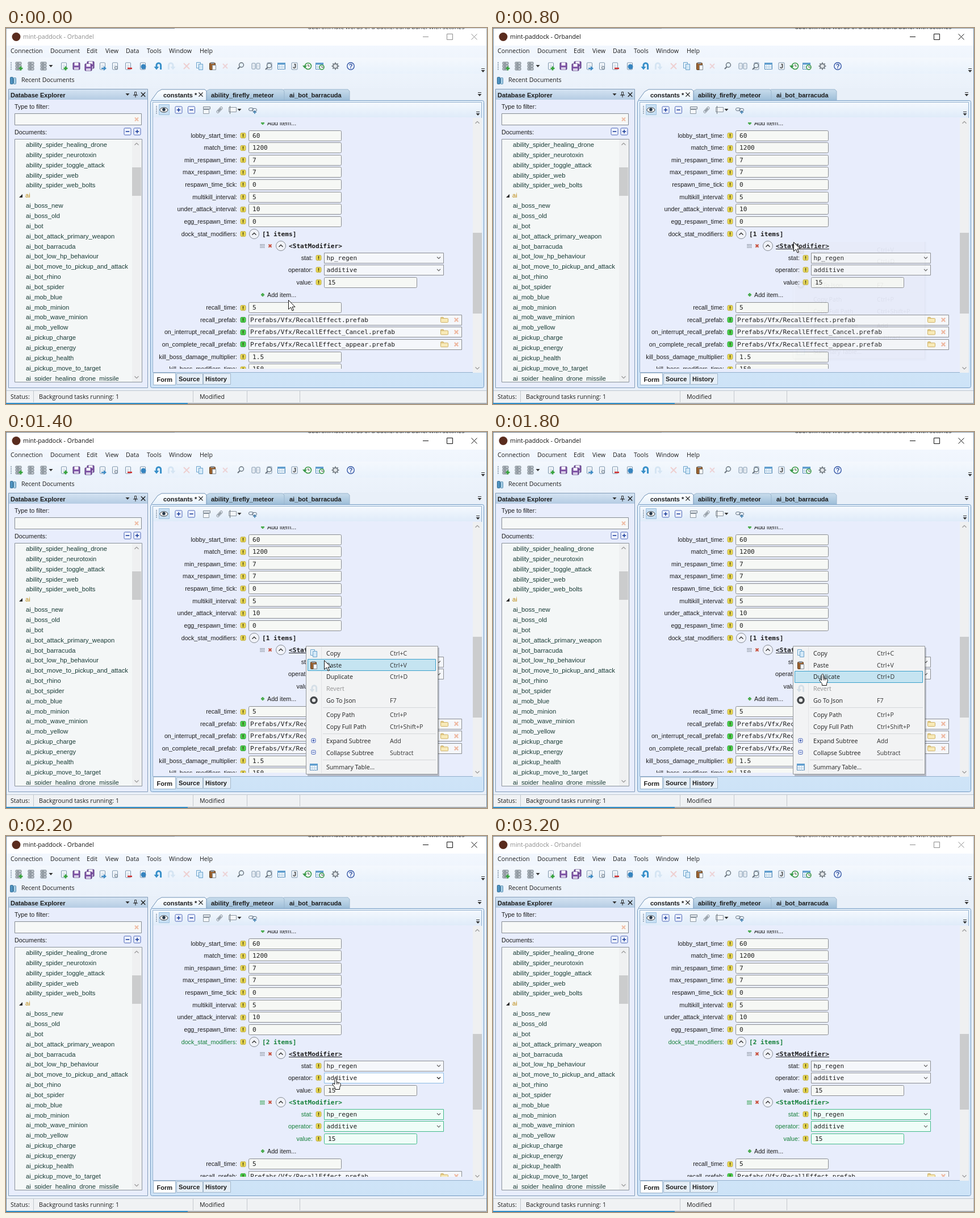
These frames come from a looping animation (847x661 px, 3400 ms). An HTML page with a canvas:

```html
<!DOCTYPE html>
<html lang="en">
<head>
<meta charset="utf-8">
<title>Document editor</title>
<style>
html, body { margin: 0; width: 100%; height: 100%; overflow: hidden; background: #eef4fc; }
canvas { display: block; }
</style>
</head>
<body>
<canvas id="stage" width="847" height="661"></canvas>
<script>
const g = document.getElementById('stage').getContext('2d');
const UI = '10.65px "Open Sans", sans-serif';
const LABEL = '10.72px "Liberation Sans", Arial, sans-serif';
const TREE = '11.24px "Liberation Sans", Arial, sans-serif';
const BOLD = 'bold 11px "Liberation Sans", Arial, sans-serif';
const MONO = '11.15px "DejaVu Sans Mono", monospace';
const INK = '#1c1c1c', GREEN = '#15803a', RED = '#c8503c';

// Drawing helpers; boxes are given by their outer pixel bounds.
function box(x, y, w, h, fill, stroke, r = 0) {
  g.beginPath();
  const d = stroke ? .5 : 0;
  g.roundRect(x + d, y + d, w - 2 * d, h - 2 * d, r);
  if (fill) { g.fillStyle = fill; g.fill(); }
  if (stroke) { g.strokeStyle = stroke; g.lineWidth = 1; g.stroke(); }
}
function text(s, x, y, font = UI, color = INK, align = 'left') {
  g.font = font; g.fillStyle = color; g.textAlign = align;
  g.fillText(s, x, y);
}
// Baseline that centres a line of text on y
const base = y => Math.round(y + 3.5);
function line(pts, color = INK, w = 1) {
  g.beginPath();
  for (let i = 0; i < pts.length; i += 2) g.lineTo(pts[i], pts[i + 1]);
  g.strokeStyle = color; g.lineWidth = w; g.stroke();
}
function shape(pts, color) {
  g.beginPath();
  for (let i = 0; i < pts.length; i += 2) g.lineTo(pts[i], pts[i + 1]);
  g.fillStyle = color; g.fill();
}
function disc(x, y, r, fill, stroke, w = 1) {
  g.beginPath(); g.arc(x, y, r, 0, 7);
  if (fill) { g.fillStyle = fill; g.fill(); }
  if (stroke) { g.strokeStyle = stroke; g.lineWidth = w; g.stroke(); }
}
function fade(y0, y1, ...colors) {
  const f = g.createLinearGradient(0, y0, 0, y1);
  colors.forEach((c, i) => f.addColorStop(i / (colors.length - 1), c));
  return f;
}
function clipped(x, y, w, h, draw) {
  g.save(); g.beginPath(); g.rect(x, y, w, h); g.clip(); draw(); g.restore();
}
function cross(x, y, r, color, w) {
  line([x - r, y - r, x + r, y + r], color, w);
  line([x + r, y - r, x - r, y + r], color, w);
}
function plus(x, y, r, color, w, minus) {
  line([x - r, y, x + r, y], color, w);
  if (!minus) line([x, y - r, x, y + r], color, w);
}
const chevron = (x, y, r, dir, color, w = 1.2) =>
  line([x - r, y - dir * r / 2, x, y + dir * r / 2, x + r, y - dir * r / 2], color, w);
const drop = (x, y, c = '#333') => shape([x - 3.5, y - 2, x + 3.5, y - 2, x, y + 2], c);
function overflowMark(x, y) { line([x - 3, y - 3.5, x + 3, y - 3.5], '#333'); drop(x, y + 1); }

// Icons, centred on x, y
function page(x, y, w = 9, h = 12) {
  box(x - w / 2, y - h / 2, w, h, '#f8fbfe', '#7890a8', 1);
  for (let i = -2; i < 4; i += 2) line([x - w / 4, y + i, x + w / 4, y + i], '#b6c6d6', .8);
}
function stack(x, y) {
  for (let i = -1; i < 2; i++) {
    box(x - 5.5, y + i * 5 - 2.5, 11, 5, '#c3cad0', '#737d85', 1);
    line([x - 3, y + i * 5, x + 1, y + i * 5], '#5c666e');
  }
}
function disk(x, y) {
  box(x - 6.5, y - 6.5, 13, 13, '#8257a8', '#523678', 1);
  box(x - 3.5, y - 6, 7, 5, '#f4f1fa');
  box(x - 4, y + 2, 8, 4, '#d6cce6');
}
function lens(x, y) {
  line([x - 5, y + 5, x - 1, y + 1], '#69737d', 2.2);
  disc(x + 1.5, y - 2, 4, '#e8f3fc', '#69737d', 1.4);
}
function table(x, y) {
  box(x - 7, y - 6, 14, 12, '#f7fbff', '#5187b5');
  box(x - 7, y - 6, 14, 3.5, '#5f9dce');
  for (let i = -3; i < 6; i += 4) line([x + i, y - 2, x + i, y + 6], '#a9c8e0');
  line([x - 6, y + 1.5, x + 6, y + 1.5], '#a9c8e0');
}
function copies(x, y, edge = '#6ba3cc') {
  box(x - 6, y - 7, 8, 11, '#e6f2fb', edge);
  box(x - 2, y - 4, 8, 11, '#d3e8f7', edge);
}
function clipboard(x, y) {
  box(x - 6, y - 6, 11, 13, '#9a6230', '#5e3b1c', 1);
  box(x - 3.5, y - 7, 6, 3, '#8c949c');
  box(x - 1, y - 2, 7, 9, '#f6f8fa', '#858d95');
}
function clock(x, y, r) {
  disc(x, y, r, '#f4fbf5', '#3d9a4c', 1.6);
  line([x, y - r + 2, x, y, x + 3, y], '#444');
}
function arrowBack(x, y, color, flip) {
  g.save(); g.translate(x, y); g.scale(flip ? -1 : 1, 1);
  g.beginPath();
  g.moveTo(-3, 1); g.lineTo(-3, -1.5); g.arc(.8, -1.5, 3.8, Math.PI, 0); g.lineTo(4.6, 6);
  g.strokeStyle = color; g.lineWidth = 3; g.stroke();
  shape([-7.5, 1, 1.5, 1, -3, 6.5], color);
  g.restore();
}
function folder(x, y) {
  box(x - 7, y - 5, 6, 4, '#f0dd9e', '#c5a75c', 1);
  box(x - 7, y - 3, 14, 8, '#f8eab8', '#cfb164', 1);
}
function signBox(x, y, minus, s = 13) {
  box(x - s / 2, y - s / 2, s, s, '#f0f4ff', '#4963b5', 1.5);
  plus(x, y, s / 4, '#1f3f9c', s > 10 ? 1.6 : 1, minus);
}
function link(x, y) {
  box(x - 7, y - 4, 9, 6, null, '#687786', 3);
  box(x - 1, y - 3, 9, 6, null, '#687786', 3);
}
function badge(x, y, green) {
  box(x - 5, y - 5, 10, 10, green ? '#4bcf4c' : '#e6d650', green ? '#35a53a' : '#c2b04a', 2);
  line([x, y - 3, x, y + 1], '#3b3510', 1.4);
  box(x - .7, y + 1.6, 1.4, 1.4, '#3b3510');
}

function titleBar(active) {
  box(0, 0, 847, 31, '#fff');
  box(0, 0, 297, 1, '#6b7885');
  box(297, 0, 550, 1, active ? '#8797a6' : '#c4ccd4');
  clipped(530, 0, 310, 2, () =>
    text('approximate words of a background panel with settings', 532, 1.5, UI, '#444'));
  disc(18, 15.5, 7.5, '#5a2c1e');
  const c = active ? '#111' : '#8d8d8d';
  text('mint-paddock - Orbandel', 30, 19, UI, c);
  line([734, 15.5, 744, 15.5], c);
  box(776, 10, 11, 11, null, c);
  cross(824.5, 15.5, 5, c, 1);
}

function toolbars() {
  box(0, 31, 847, 75, fade(31, 106, '#f2f7fe', '#eaf1fa'));
  box(0, 52, 847, 28, fade(52, 80, '#f4f8fd', '#e9f2fc'));
  [['Connection', 8], ['Document', 78], ['Edit', 142], ['View', 175], ['Data', 211],
   ['Tools', 248], ['Window', 287], ['Help', 341]].forEach(([s, x]) => text(s, x, 44));
  const y = 67;
  for (let i = -7; i < 8; i += 3) box(8, y + i, 2, 1.5, '#8797a8');
  [22, 44, 66].forEach(x => stack(x, y));
  plus(26, y + 4, 3.5, '#35a53b', 2.5);
  drop(79, y);
  [102, 170, 192, 215, 241].forEach(x => page(x, y, 10, 13));
  plus(105, y + 4, 3.5, '#35a53b', 2.5);
  disk(124, y); disk(149, y - 2); disk(145, y + 2);
  shape([168, y + 3, 172, y + 3, 172, y, 177, y + 4, 172, y + 8, 172, y + 5, 168, y + 5], '#3f8dc6');
  disc(194, y + 3, 2.5, '#dbe6f0', '#69737d');
  plus(218, y + 4, 4, '#d02b2b', 2.5, true);
  disc(242, y + 1, 4.5, '#3684bf');
  arrowBack(268, y, '#378fc9');
  arrowBack(291, y, '#d5e5f3', true);
  cross(318, y, 5, '#eecfd0', 2);
  copies(341, y); clipboard(364, y);
  cross(386, y, 4, '#edd3d7', 2);
  lens(413, y);
  page(436, y, 7, 11); page(444, y, 7, 11);
  page(464, y, 9, 13); lens(462, y + 1);
  table(485, y);
  page(508, y, 11, 13); text('J', 508, y + 4, BOLD, '#444', 'center');
  clock(532, y, 5.5); shape([522, y - 1, 530, y - 1, 526, y + 4], '#3d9a4c');
  table(552, y); clock(556, y + 2, 4);
  for (let a = 0; a < 8; a++) {
    const c = Math.cos(a * Math.PI / 4), s = Math.sin(a * Math.PI / 4);
    line([580 + 4 * c, y + 4 * s, 580 + 6.5 * c, y + 6.5 * s], '#7b838a', 2);
  }
  disc(580, y, 4, '#e3e7ea', '#7b838a', 2);
  disc(607, y, 6.2, '#eef4ff', '#3557a6', 1.4);
  text('?', 607, y + 4, BOLD, '#2b4b9b', 'center');
  overflowMark(840, 75);
  box(7, 86, 6, 13, '#4f93c0', '#356c92', 1);
  box(13, 87, 5, 12, '#a9cfe6', '#4f88ad', 1);
  text('Recent Documents', 27, 95);
}

const names = ['ability_spider_healing_drone', 'ability_spider_neurotoxin',
  'ability_spider_toggle_attack', 'ability_spider_web', 'ability_spider_web_bolts', 'ai',
  ...('boss_new boss_old bot bot_attack_primary_weapon bot_barracuda bot_low_hp_behaviour ' +
  'bot_move_to_pickup_and_attack bot_rhino bot_spider mob_blue mob_minion mob_wave_minion ' +
  'mob_yellow pickup_charge pickup_energy pickup_health pickup_move_to_target ' +
  'spider_healing_drone_missile').split(' ').map(s => 'ai_' + s)];

function scrollbar(x, top, bottom, from, to) {
  box(x, top, 16, bottom - top, '#eff0f1');
  box(x, from, 16, to - from, '#cbcccd');
  chevron(x + 8, top + 8, 3.5, -1, '#999');
  chevron(x + 8, bottom - 8, 3.5, 1, '#999');
}

function explorer() {
  box(4, 107, 246, 526, '#e8edfc', '#829bb8');
  box(5, 108, 244, 18, fade(108, 126, '#d4e3f2', '#b5cce3'));
  text('Database Explorer', 8, 122, BOLD);
  drop(214, 117);
  box(226, 112, 4, 6, null, '#333');
  line([224, 118, 232, 118]); line([228, 118, 228, 122]);
  cross(241.5, 117, 3.7, '#222', 1.4);
  text('Type to filter:', 15, 142, LABEL);
  box(15, 150, 224, 21, '#f6f8f7', '#858b92');
  cross(230, 160.5, 3, '#efbda6', 2);
  text('Documents:', 15, 187, LABEL);
  signBox(214, 182, true); signBox(231, 182);
  box(15, 195, 225, 428, '#f4f7f7', '#8a929a');
  clipped(16, 196, 206, 424, () => names.forEach((s, i) => {
    const y = Math.round(209 + i * 17.85);
    if (s == 'ai') shape([23, y, 29, y, 29, y - 6], '#222');
    text(s, s == 'ai' ? 34 : 35, y, TREE, s == 'ai' ? '#bd8a14' : '#183b36');
  }));
  scrollbar(222, 196, 622, 245, 295);
}

function tab(x, w, s, tx, active) {
  const pts = [x, 127, x + 11, 112, x + 18, 108, x + w - 3, 108, x + w, 111, x + w, 127];
  shape(pts, active ? fade(108, 127, '#fdfeff', '#e7f2fc') : fade(108, 127, '#c8dcec', '#9fbfd9'));
  line(pts, active ? '#6f91b5' : '#9bb6ce');
  text(s, tx, 122, BOLD);
}

function frame() {
  box(254, 127, 588, 506, fade(127, 633, '#e7f2fc', '#dcebfa', '#cde3f7'), '#7299c2', 3);
  tab(472, 133, 'ai_bot_barracuda', 499);
  tab(340, 150, 'ability_firefly_meteor', 361);
  tab(256, 97, 'constants *', 277, true);
  cross(343, 117, 3.6, '#222', 1.3);
  overflowMark(834, 117);
  box(258, 130, 580, 476, '#e8edfc', '#93b0cd');
  box(259, 131, 578, 26, fade(131, 157, '#f4f8fe', '#dfebf9'));
  for (let i = -7; i < 8; i += 3) box(264, 144 + i, 2, 1.5, '#8797a8');
  box(269, 134, 19, 19, '#c7dff3', '#9fc2e0');
  g.beginPath(); g.ellipse(278, 144, 7, 4, 0, 0, 7);
  g.fillStyle = '#fff'; g.fill(); g.strokeStyle = '#333'; g.stroke();
  disc(278, 143.5, 2.8, '#26384a');
  signBox(304, 144); signBox(326.5, 144, true);
  box(347, 138, 13, 5, '#dde3e9', '#78838e');
  box(347, 143, 11, 8, '#f4f7fa', '#8d98a2');
  g.save(); g.translate(376, 144); g.rotate(.75);
  box(-2.5, -7, 5, 14, null, '#8b949c', 2.5); box(-1, -4, 2, 8, null, '#8b949c', 1);
  g.restore();
  box(392, 139, 14, 9, '#f2f5f8', '#8c959e');
  line([394.5, 137, 394.5, 151], '#656e76'); drop(411, 144);
  link(434, 144); plus(438, 148, 3, '#4180b2', 1.5);
  overflowMark(831, 151);
  box(259, 606, 40, 22, '#fff', '#9ab1c8');
  box(300, 607, 47, 20, '#e5eef7', '#a3b7cb');
  box(347, 607, 49, 20, '#e5eef7', '#a3b7cb');
  text('Form', 265.5, 622, BOLD);
  text('Source', 304, 621, BOLD);
  text('History', 351, 621, BOLD);
}

function statusBar(active) {
  box(0, 637, 847, 22, '#f0f2f4');
  line([0, 637.5, 847, 637.5], '#bfc7cf');
  [49, 330, 425, 518].forEach(x => line([x - .5, 638, x - .5, 658], '#c3c8cd'));
  text('Status:', 8, 652);
  text('Background tasks running: 1', 58, 652);
  text('Modified', 341, 652);
  box(0, 659, 320, 2, '#2d8bc8');
  box(320, 659, 527, 2, '#a5abb1');
  const edge = active ? '#6f8ca6' : '#aab4be';
  line([846.5, 1, 846.5, 659], edge); line([.5, 1, .5, 659], edge);
}

// One form row; kind is '', 'file' or 'list', look is '', 'new' or 'hover'.
function field(y, label, value, kind = '', look = '') {
  const nested = ['stat', 'operator', 'value'].includes(label), x = nested ? 560 : 427;
  const fresh = look == 'new';
  text(label + ':', x - 20, base(y), LABEL, fresh ? GREEN : INK, 'right');
  badge(x - 9.5, Math.round(y), kind == 'file');
  const w = kind == 'file' ? 376 : kind == 'list' ? 211 : 164;
  const fill = fresh ? '#effdf8' : look ? '#fdfeff' : kind ? '#f5f7fb' : '#f6f8f5';
  box(x, Math.round(y - 9.5), w, 19, fill, fresh ? '#43b98a' : look ? '#8bbbe4' : '#8a8d91', kind ? 0 : 2);
  text(value, x + (kind == 'file' ? 3 : kind ? 4.5 : 7), base(y), MONO);
  if (kind == 'list') chevron(762, y, 3, 1, look == 'hover' ? '#111' : '#666');
  if (kind == 'file') { folder(772, y); cross(793, y, 3.2, '#eeb9a2', 2.2); }
}
function collapser(x, y) {
  disc(x, y, 8.5, '#f0f2f8', '#858b93');
  chevron(x, y, 3.5, -1, '#333', 1.4);
}
function adder(y) {
  plus(452, y, 3, '#48aa4c', 2.6);
  text('Add item...', 460, base(y), LABEL);
}
function modifier(y, { fresh, selected, hover }) {
  const look = fresh ? 'new' : '';
  for (let i = 0; i < 12; i++)
    box(447.5 + i % 4 * 2.2, y - 3 + Math.floor(i / 4) * 2.6, 1.2, fresh ? 2 : 1.2, fresh ? '#2a9d45' : '#59626b');
  cross(465, y, 2.5, RED, 2);
  collapser(484, y);
  text('<StatModifier>', 498, base(y), 'bold ' + MONO, fresh ? GREEN : INK);
  if (selected) line([498, y + 5.5, 592, y + 5.5]);
  field(y + 21, 'stat', 'hp_regen', 'list', look);
  field(y + 42.3, 'operator', 'additive', 'list', hover ? 'hover' : look);
  field(y + 64, 'value', '15', '', look);
}

function form({ doubled, selected, hover }) {
  clipped(259, 166, 563, 433, () => {
    adder(167);
    [['lobby_start_time', 60], ['match_time', 1200], ['min_respawn_time', 7], ['max_respawn_time', 7],
     ['respawn_time_tick', 0], ['multikill_interval', 5], ['under_attack_interval', 10],
     ['egg_respawn_time', 0]].forEach(([s, v], i) => field(189 + i * 21.6, s, v));
    const c = doubled ? GREEN : INK;
    text('dock_stat_modifiers:', 407, base(362), LABEL, c, 'right');
    badge(417.5, 362);
    collapser(437, 362);
    text(`[${doubled ? 2 : 1} items]`, 451, base(362), 'bold ' + MONO, c);
    modifier(383, { selected, hover });
    if (doubled) modifier(468, { fresh: true });
    const y = doubled ? 554 : 469;
    adder(y);
    field(y + 22.5, 'recall_time', 5);
    ['recall_prefab|', 'on_interrupt_recall_prefab|_Cancel', 'on_complete_recall_prefab|_appear']
      .forEach((s, i) => {
        const [label, end] = s.split('|');
        field(y + 44 + i * 21.6, label, `Prefabs/Vfx/RecallEffect${end}.prefab`, 'file');
      });
    field(y + 109, 'kill_boss_damage_multiplier', 1.5);
    field(y + 130.5, 'kill_boss_modifiers_time', 150);
  });
  scrollbar(822, 158, 606, doubled ? 348 : 360, doubled ? 481 : 502);
}

const items = [['Copy', 'Ctrl+C', 389], ['Paste', 'Ctrl+V', 410], ['Duplicate', 'Ctrl+D', 430.5],
  ['Revert', '', 451.5], ['Go To Json', 'F7', 472], ['Copy Path', 'Ctrl+P', 497],
  ['Copy Full Path', 'Ctrl+Shift+P', 518], ['Expand Subtree', 'Add', 543.5],
  ['Collapse Subtree', 'Subtract', 564], ['Summary Table...', '', 589]];

function menu(hot) {
  box(531, 379, 232, 226, 'rgba(0,0,0,.22)');
  box(528, 376, 233, 226, '#f2f3f4', '#929699');
  line([555.5, 378, 555.5, 600], '#e2e4e6');
  [484.5, 530.5, 576.5].forEach(y => line([558, y, 757, y], '#d3d6d9'));
  items.forEach(([s, key, y], i) => {
    if (i == hot) box(531, Math.round(y - 11), 226, 21, '#c5e4f1', '#3aa0cb');
    text(s, 564, base(y), UI, s == 'Revert' ? '#929292' : INK);
    text(key, 676, base(y), UI, '#333');
  });
  copies(542, 389); clipboard(542, 410);
  arrowBack(542, 451, '#d5dfe7');
  disc(542, 471.5, 5, '#e9e9e9', '#45484b', 3.5);
  signBox(541.5, 542.5, false, 8); signBox(541.5, 563, true, 8);
  table(542, 589);
}

// The menu slides down out of its top edge while it fades in.
function openingMenu() {
  clipped(528, 376, 236, 230, () => {
    g.globalAlpha = .06;
    g.translate(0, -20);
    menu(-1);
  });
}

const handPath = new Path2D('M-1.6 1Q0-1 1.6 1V7L7 8.5Q9 9.5 8.8 12L7 17V20H-1V17L-5.5 11.5Q-6 9-4 9.3L-1.6 11Z');
const arrowPath = new Path2D('M0 0V16L4 12.5 6.5 18.5 9 17.5 6.5 11.8H11.5Z');
function pointer(x, y, hand) {
  g.save(); g.translate(x + .5, y + .5);
  const p = hand ? handPath : arrowPath;
  g.fillStyle = '#fff'; g.fill(p);
  g.strokeStyle = '#111'; g.lineWidth = 1; g.lineJoin = 'round'; g.stroke(p);
  if (hand) { line([2, 7, 2, 11]); line([4.5, 8, 4.5, 11]); }
  g.restore();
}

const STEP = 200, LOOP = 3400;
const path = [[497, 478], [518, 419], [529, 376], [529, 376], [529, 376], [529, 376], [531, 378],
  [560, 401], [572, 421], [580, 425], [580, 425], [580, 425], [580, 425], [538, 470]];

function draw(n) {
  const active = n >= 3 && n < 16, doubled = n >= 10;
  box(0, 0, 847, 661, '#e9f0f9');
  titleBar(active);
  toolbars();
  explorer();
  frame();
  form({ doubled, selected: n >= 3, hover: doubled && n < 13 });
  statusBar(active);
  if (n == 4) openingMenu();
  if (n > 4 && !doubled) menu(n == 7 ? 1 : n > 7 ? 2 : -1);
  if (path[n]) pointer(...path[n], n >= 9 && n < 13);
}

const start = performance.now();
function tick() {
  draw(Math.floor((performance.now() - start) % LOOP / STEP));
  requestAnimationFrame(tick);
}
tick();
</script>
</body>
</html>
```
